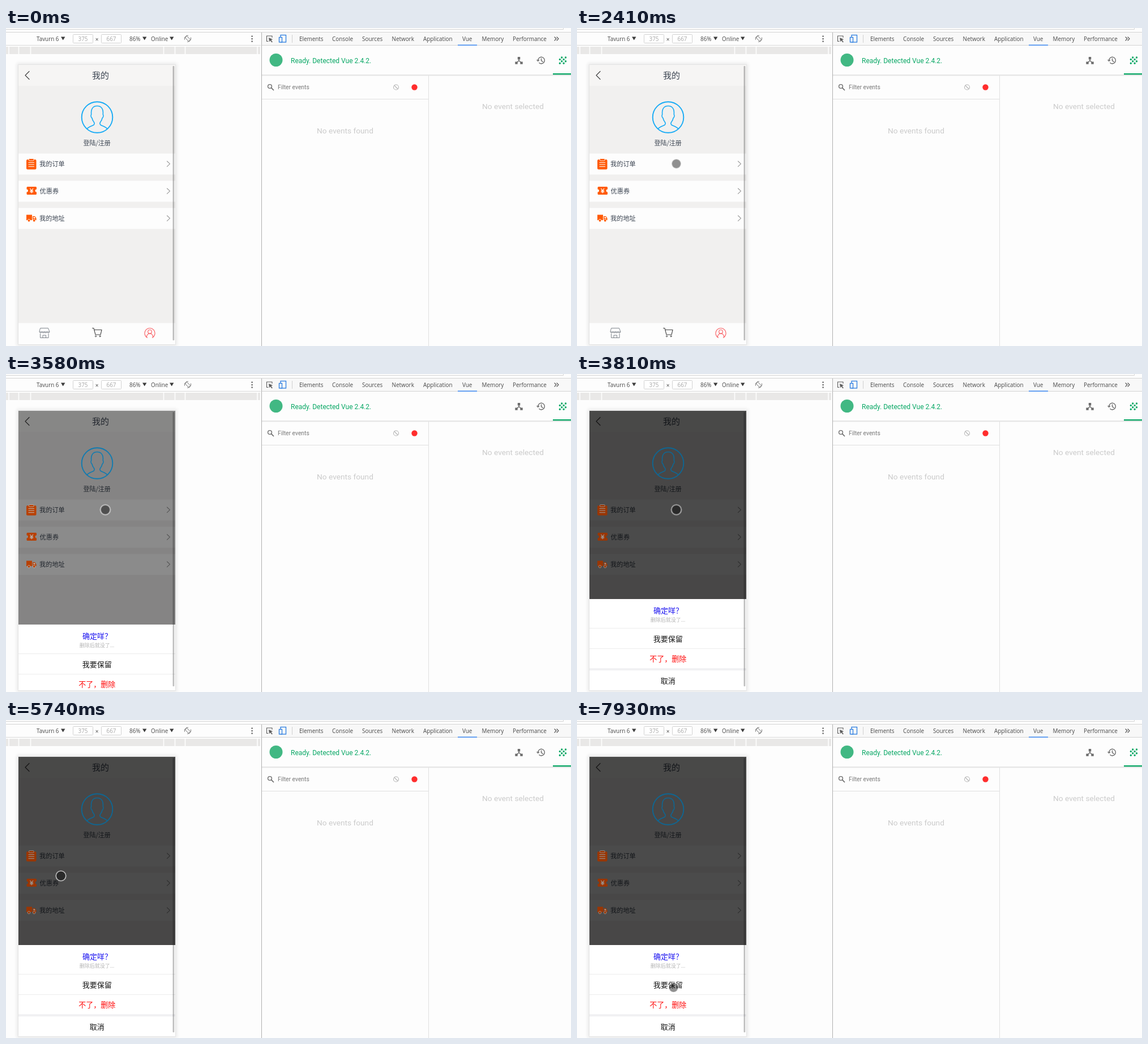
An HTML page for the animation above (7.99 s loop, 998 px wide and 561 px high).

```html
<!DOCTYPE html>
<html lang="zh-CN">
<head>
<meta charset="utf-8">
<title>Action sheet demo</title>
<style>
html, body { margin: 0; width: 100%; height: 100%; overflow: hidden; background: #fdfdfd; }
svg { display: block; width: 998px; height: 561px; }
text { white-space: pre; }
.bar { font: 9.9px "Open Sans", "Noto Sans", sans-serif; fill: #484848; }
.panel { font-family: Roboto, sans-serif; }
.cn { font-family: "Noto Sans CJK SC", "Noto Sans CJK", sans-serif; font-weight: 300; fill: #3c4552; }
.mid { text-anchor: middle; }
.line { fill: none; stroke-linecap: round; stroke-linejoin: round; }

.shade, .sheet, .icons { animation: 7990ms step-end infinite; }
.shade { animation-name: dim; }
.sheet { animation-name: rise; }
.icons { animation-name: fade; }
@keyframes dim {
  0% { opacity: 0; }
  44.05% { opacity: .27; }
  44.8% { opacity: .45; }
  45.55% { opacity: .58; }
  46.3% { opacity: .65; }
  47.05% { opacity: .69; }
  47.68%, 100% { opacity: .7; }
}
@keyframes fade {
  0% { filter: brightness(1); }
  44.05% { filter: brightness(.8); }
  44.8% { filter: brightness(.72); }
  45.55% { filter: brightness(.66); }
  46.3%, 100% { filter: brightness(.6); }
}
@keyframes rise {
  0% { transform: translateY(165px); }
  44.05% { transform: translateY(90px); }
  44.8% { transform: translateY(45px); }
  45.55% { transform: translateY(20px); }
  46.3% { transform: translateY(7px); }
  47.05% { transform: translateY(2px); }
  47.68%, 100% { transform: translateY(0); }
}

/* The pointer moves in short bursts, about 60 ms per step, and rests between. */
.pointer { animation: point 7990ms step-end infinite; }
@keyframes point {
  0% { transform: translate(-30px, 238px); }
  14.89% { transform: translate(-4.5px, 238px); }
  16.39% { transform: translate(-30px, 260px); }
  24.15% { transform: translate(-12px, 304px); animation-timing-function: steps(2); }
  25.65% { transform: translate(12px, 290px); animation-timing-function: steps(3); }
  27.9% { transform: translate(110px, 262px); animation-timing-function: steps(3); }
  30.16% { transform: translate(175.5px, 239.5px); }

  53.8% { transform: translate(175.5px, 239.5px); animation-timing-function: steps(3); }
  56.47% { transform: translate(172px, 275px); animation-timing-function: steps(4); }
  60.02% { transform: translate(215px, 350px); animation-timing-function: steps(2); }
  61.8% { transform: translate(269px, 371px); animation-timing-function: steps(2); }
  63.57% { transform: translate(244px, 362.5px); }

  64.33% { transform: translate(238px, 362px); animation-timing-function: steps(3); }
  66.72% { transform: translate(200px, 375px); animation-timing-function: steps(3); }
  69.12% { transform: translate(120px, 345px); animation-timing-function: steps(3); }
  71.52% { transform: translate(97px, 275px); animation-timing-function: steps(2); }
  73.11% { transform: translate(122px, 227px); animation-timing-function: steps(2); }
  74.71% { transform: translate(168px, 253px); }
  78.59% { transform: translate(158px, 251px); }

  80.1% { transform: translate(158px, 251px); animation-timing-function: steps(3); }
  82.22% { transform: translate(126.5px, 380.5px); }
  82.97% { transform: translate(121px, 398px); animation-timing-function: steps(3); }
  85.23% { transform: translate(161px, 430px); }

  90.65% { transform: translate(161px, 430px); animation-timing-function: steps(3); }
  92.8% { transform: translate(205px, 448px); animation-timing-function: steps(3); }
  94.95% { transform: translate(230px, 468px); animation-timing-function: steps(3); }
  97.09% { transform: translate(200px, 479px); animation-timing-function: steps(3); }
  99.24%, 100% { transform: translate(170.5px, 472px); }
}
</style>
</head>
<body>
<svg viewBox="0 0 998 561">
  <defs>
    <clipPath id="screen"><rect x="22" y="65" width="277" height="493"/></clipPath>
    <filter id="soft" x="-10%" y="-10%" width="120%" height="120%"><feGaussianBlur stdDeviation="3"/></filter>
    <path id="down" d="M0 0h7.4l-3.7 6z" fill="#3c3c3c"/>
    <path id="next" class="line" d="M0 0l5 4.7-5 4.7" stroke="#999" stroke-width="1.1"/>
  </defs>

  <!-- window edge and device toolbar -->
  <rect width="998" height="561" fill="#fdfdfd"/>
  <path d="M0 2.5H984.500V0M0 7.500H998" fill="none" stroke="#d4d4d4"/>
  <path d="M0 30.500H450" stroke="#d8d8d8"/>
  <g class="bar">
    <text x="54" y="23">Tavurn 6</text>
    <text x="218" y="23">86%</text>
    <text x="256" y="23">Online</text>
    <text x="160.500" y="23.500" class="mid">×</text>
  </g>
  <g fill="#fff" stroke="#d2d2d2">
    <rect x="118.500" y="11.500" width="35" height="15" rx="1"/>
    <rect x="168.500" y="11.500" width="35" height="15" rx="1"/>
  </g>
  <g class="bar mid">
    <text x="136" y="23" style="fill:#a6a6a6">375</text>
    <text x="186" y="23" style="fill:#a6a6a6">667</text>
  </g>
  <use href="#down" x="97" y="15.500"/>
  <use href="#down" x="241" y="15.500"/>
  <use href="#down" x="289" y="15.500"/>
  <g class="line" stroke="#666" stroke-width=".900">
    <rect x="318.800" y="14.300" width="4.400" height="9" rx=".500" transform="rotate(-45 321 18.800)"/>
    <path d="M315.500 20.500a5.700 5.700 0 0 1 6-7.300M326.500 17a5.700 5.700 0 0 1-6 7.300"/>
  </g>
  <path d="M433.500 13.500h2.200v2.200h-2.200zM433.500 18h2.200v2.200h-2.200zM433.500 22.500h2.200v2.200h-2.200z" fill="#5a5a5a"/>
  <path d="M0 33H449V46H0z" fill="#e9e8e7"/>
  <path d="M5 33v13M22.500 33v13M43.500 33v13M278.500 33v13M298.500 33v13M316.500 33v13M444 33v13" stroke="#fdfdfd" stroke-width="1.700"/>

  <!-- phone -->
  <rect x="19" y="62" width="283" height="499" opacity=".08" filter="url(#soft)"/>
  <g clip-path="url(#screen)">
    <rect x="22" y="65" width="277" height="493" fill="#f1f0ef"/>
    <rect x="22" y="65" width="277" height="37" fill="#f6f5f4"/>
    <path d="M22 221.500h277v37H22zM22 269.500h277v37H22zM22 317.500h277v37H22zM22 520.500h277v38H22z" fill="#fdfdfd"/>
    <path d="M41 76.500l-7 7 7 7" class="line" stroke="#444" stroke-width="1.200"/>
    <g class="cn">
      <text x="152" y="89" font-size="15">我的</text>
      <text x="160.700" y="207.200" font-size="11" class="mid">登陆/注册</text>
      <g font-size="11.200">
        <text x="59" y="243.700">我的订单</text>
        <text x="59.500" y="291.700">优惠券</text>
        <text x="59" y="339.700">我的地址</text>
      </g>
    </g>
    <use href="#next" x="284.500" y="235"/>
    <use href="#next" x="284.500" y="283"/>
    <use href="#next" x="284.500" y="331"/>

    <!-- tab bar -->
    <g class="line" stroke="#737a82" stroke-width=".900">
      <path d="M61 529.500h13.500l2.500 6.500a2.300 2.300 0 0 1-4.500 0 2.300 2.300 0 0 1-4.500 0 2.300 2.300 0 0 1-4.500 0 2.300 2.300 0 0 1-4.500 0zM59.500 536h17M60.500 539.500v7h14.500v-7M65 546.500v-4.500h5.500v4.500"/>
      <path d="M152.500 529.500h2.500l3 11.500h9l2-8.500h-13" stroke="#444" stroke-width="1.100"/>
      <circle cx="158.500" cy="543.800" r="1.100" stroke="#444"/>
      <circle cx="166" cy="543.800" r="1.100" stroke="#444"/>
    </g>
    <g class="line" stroke="#f9686c" stroke-width="1.200">
      <path d="M249.500 546.300a9 9 0 1 1 9 0"/>
      <circle cx="254" cy="535.800" r="3.300"/>
      <path d="M248.500 544.500c.500-7 10.500-7 11 0"/>
    </g>

    <rect class="shade" x="22" y="65" width="277" height="493"/>

    <g class="icons">
      <g class="line" stroke="#18abf5" stroke-width="1.900">
        <circle cx="161" cy="157.500" r="27.300"/>
        <path stroke-width="1.600" d="M143 178c3-4 8.500-5 12-7 1.500-1.500 1-4 0-5.500-2-2-2.500-4-3-6.500-2-1-2.500-5-1.300-6.500-1-9 2.500-15 10.300-15s11.300 6 10.300 15c1.200 1.500.700 5.500-1.300 6.500-.500 2.500-1 4.500-3 6.500-1 1.500-1.500 4 0 5.500 3.500 2 9 3 12 7"/>
      </g>
      <g fill="#ff5a06">
        <rect x="36" y="232" width="17.500" height="17.500" rx="2"/>
        <rect x="40.500" y="230.500" width="8.500" height="3.800" rx=".800" stroke="#fff" stroke-width=".800"/>
        <path d="M38 280h14.500q1.500 0 1.500 1.500v3a2.500 2.500 0 0 0 0 5v3q0 1.500-1.500 1.500H38q-1.500 0-1.500-1.500v-3a2.500 2.500 0 0 0 0-5v-3q0-1.500 1.500-1.500z"/>
        <path d="M36 329.500h10v9.500H36zM47 332h4l2.500 3.500v3.500H47z"/>
      </g>
      <path d="M48.500 333.300h2l1.500 2.400h-3.500z" fill="#fff"/>
      <g fill="#ff5a06" stroke="#fff" stroke-width=".800">
        <circle cx="40.500" cy="339.700" r="2.300"/>
        <circle cx="49.700" cy="339.700" r="2.300"/>
      </g>
      <path class="line" d="M40 237.500h9.500M40 241h9.500M40 244.500h9.500M42.700 283.500l2.500 3.300 2.500-3.300M45.200 287v4M42.700 287.200h5M42.700 289.200h5" stroke="#fff" stroke-width="1.200"/>
    </g>

    <!-- action sheet -->
    <g class="sheet">
      <rect x="22" y="397" width="277" height="163" fill="#fff"/>
      <path d="M22 448.500h277M22 484.500h277" stroke="#ececec"/>
      <rect x="22" y="519" width="277" height="4" fill="#f1f1f3"/>
      <g class="cn mid" font-size="13" style="font-weight:400">
        <text x="161" y="421.500" style="fill:#1a12f0">确定咩？</text>
        <text x="160.500" y="437.300" font-size="9" style="fill:#b4b4b4">删除后就没了...</text>
        <text x="160.700" y="471.800" style="fill:#111">我要保留</text>
        <text x="160.700" y="506.800" style="fill:#ff0a0a">不了，删除</text>
        <text x="160.700" y="545.600" style="fill:#111">取消</text>
      </g>
    </g>
    <rect x="294.500" y="67" width="2.800" height="484" rx="1" opacity=".25"/>
  </g>
  <rect x="21.500" y="64.500" width="278" height="494" fill="none" stroke="#000" stroke-opacity=".04"/>

  <!-- inspector tabs -->
  <rect x="452" y="8" width="546" height="22" fill="#f8f8f8"/>
  <path d="M451 30.500H998" stroke="#d4d4d4"/>
  <g class="bar">
    <text x="518" y="23">Elements</text>
    <text x="576" y="23">Console</text>
    <text x="629" y="23">Sources</text>
    <text x="681.500" y="23">Network</text>
    <text x="737" y="23">Application</text>
    <text x="806" y="23">Vue</text>
    <text x="840.500" y="23">Memory</text>
    <text x="895" y="23">Performance</text>
  </g>
  <path d="M798 29.500h34v1.500h-34z" fill="#3b86f0"/>
  <path class="line" d="M969 16l3 3-3 3M973 16l3 3-3 3" stroke="#555" stroke-width="1.200"/>
  <path d="M505.500 12v14" stroke="#d0d0d0"/>
  <g class="line" stroke="#5a5a5a" stroke-width="1.100">
    <path d="M463 23.500h-2.500v-9.500h9.500v2.500"/>
    <path d="M464.500 17.500l6 2.500-2.500 1 2.500 3.500-1 .700-2.500-3.500-1.500 2z" fill="#5a5a5a" stroke-width=".500"/>
  </g>
  <g fill="#f8f8f8" stroke="#2a7de1" stroke-width="1.300">
    <rect x="485" y="12.500" width="9.500" height="12.500"/>
    <rect x="482.500" y="16.500" width="5" height="8.500"/>
  </g>

  <!-- events panel -->
  <path d="M451 83H998" stroke="#dfdfdf" stroke-width="1.500"/>
  <path d="M451 84.500H998" stroke="#f3f3f3"/>
  <path d="M746.500 84V561M451 125.500H746" stroke="#e0e0e0"/>
  <path d="M451.500 8V561" stroke="#b0b0b0"/>
  <circle cx="477" cy="56.500" r="11.500" fill="#41b883"/>
  <g class="panel">
    <text x="503" y="62" font-size="12" fill="#0aa866">Ready. Detected Vue 2.4.2.</text>
    <text x="480" y="108" font-size="10.300" fill="#777">Filter events</text>
    <g class="mid" font-size="13.700" fill="#cbcbcb">
      <text x="599" y="186">No events found</text>
      <text x="895.500" y="143">No event selected</text>
    </g>
  </g>
  <path d="M906 53.500v4l-4.500 4M906 57.500l4.500 4" class="line" stroke="#6c6c6c" stroke-width="1.500"/>
  <path d="M903.800 51h4.400v4.400h-4.400zM899.300 59.500h4.400v4.200h-4.400zM908.300 59.500h4.400v4.200h-4.400z" fill="#6c6c6c"/>
  <g class="line" stroke="#6c6c6c" stroke-width="1.400">
    <path d="M939.800 57.500a5.800 5.800 0 1 1 2 4M945.500 54v3.700l2.700 1.600"/>
    <path d="M937.500 56.500h4.600l-2.300 2.500z" fill="#6c6c6c" stroke-width=".500"/>
    <circle cx="466" cy="103" r="3.400"/>
    <path d="M468.700 105.700l3.800 3.800" stroke-width="1.700"/>
  </g>
  <!-- eight dots of a grain icon on a 4-unit grid -->
  <path class="line" transform="translate(973.200 46.900) scale(.85)" stroke="#0aa866" stroke-width="4"
    d="M10 6h0M18 6h0M6 10h0M14 10h0M10 14h0M18 14h0M6 18h0M14 18h0"/>
  <rect x="966" y="80" width="32" height="2.300" fill="#0aa866"/>
  <g class="line" stroke="#b5b5b5" stroke-width="1.100">
    <circle cx="689" cy="104.500" r="4.500"/>
    <path d="M686 101.500l6 6"/>
  </g>
  <circle cx="721.500" cy="104.500" r="5.200" fill="#ff2d2d"/>

  <g class="pointer">
    <circle r="8" opacity=".43"/>
    <circle r="8.800" fill="none" stroke="#fff" stroke-opacity=".65" stroke-width="1.600"/>
  </g>
</svg>
</body>
</html>
```
